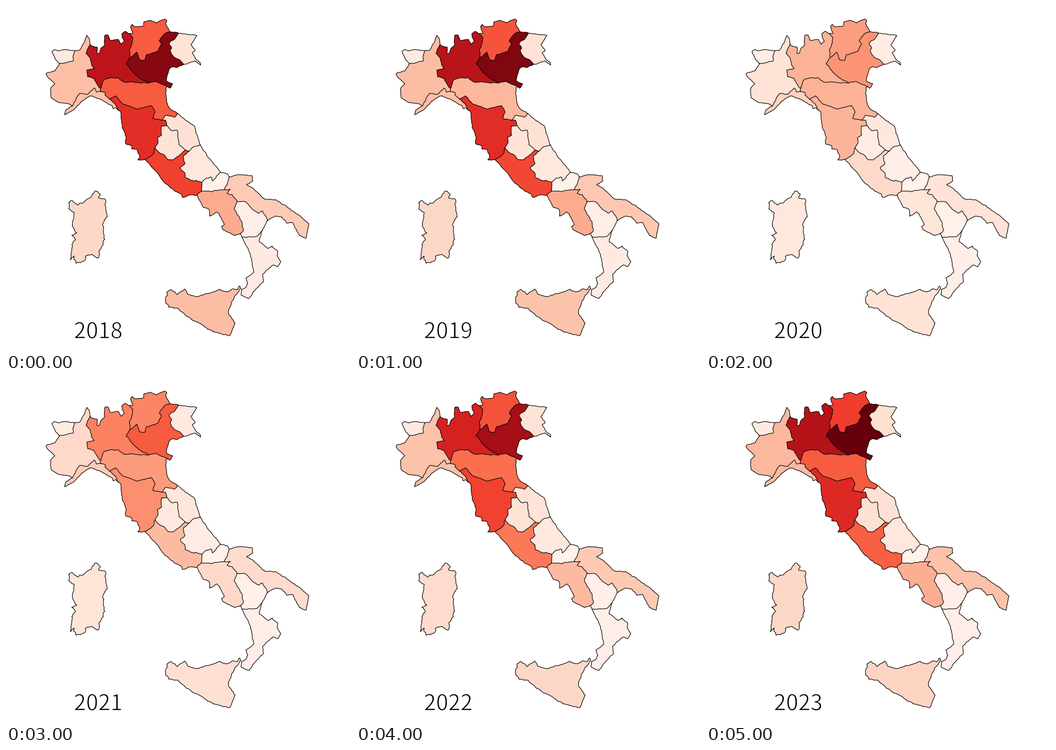
Write a matplotlib script that moves like this. It is 720x720 px and loops after 6000 ms.

```python
import numpy as np
import matplotlib.pyplot as plt
from matplotlib.animation import FuncAnimation
from matplotlib.patches import Polygon
from matplotlib.patheffects import Stroke

SIZE, DPI = 720, 72
YEARS = range(2018, 2024)
rng = np.random.default_rng(7)
reds = plt.get_cmap("Reds")

fig = plt.figure(figsize=(SIZE / DPI, SIZE / DPI), dpi=DPI, facecolor="white")
ax = fig.add_axes([0, 0, 1, 1])
ax.set_xlim(0, SIZE)
ax.set_ylim(SIZE, 0)
ax.axis("off")

borders = {}
regions = []


def border(name, *xy, rough=0.7):
    """Draw a wobbly hand-drawn line through a few key points."""
    pts = np.reshape(xy, (-1, 2)).astype(float)
    dist = np.r_[0, np.cumsum(np.hypot(*np.diff(pts, axis=0).T))]
    s = np.union1d(dist, np.arange(0, dist[-1], 3))
    path = np.column_stack([np.interp(s, dist, pts[:, k]) for k in (0, 1)])
    path[1:-1] += rng.normal(0, rough, path[1:-1].shape)
    path[1:-1] = (path[:-2] + 3 * path[1:-1] + path[2:]) / 5
    borders[name] = path
    ax.plot(*path.T, color="black", lw=1.25, zorder=2,
            solid_joinstyle="round", solid_capstyle="round")


def region(loop, before, dip, now, second=None):
    """Fill a chain of borders (a leading minus walks one backwards).

    The shade starts at `before`, drops to `dip` and climbs back to `now`.
    """
    parts = [borders[k.lstrip("-")][::-1 if k[0] == "-" else 1]
             for k in loop.split()]
    patch = ax.add_patch(Polygon(np.vstack(parts), lw=0, zorder=1))
    if second is None:
        second = before + 0.25 * (now - before)
    climb = [dip + t * (now - dip) for t in (0, 0.27, 0.8, 1)]
    regions.append((patch, [before, second, *climb]))


# North-west
border("aosta_n", 112, 121, 103, 111, 97, 95, 103, 91, 108, 94, 125, 91,
       144, 94)
border("aosta_s", 144, 94, 140, 106, 141, 115, 112, 121)
border("piem_w", 112, 121, 102, 136, 85, 141, 87, 149, 102, 163, 93, 173,
       95, 193, 110, 202, 127, 203, 139, 209)
border("piem_n", 144, 94, 155, 93, 163, 77, 169, 62, 174, 67, 176, 80)
border("piem_lomb", 176, 80, 167, 99, 177, 110, 179, 124, 185, 131, 169, 134,
       171, 148, 183, 151, 195, 171, 199, 171)
border("piem_emil", 199, 171, 198, 179)
border("piem_lig", 139, 209, 153, 183, 171, 185, 184, 172, 190, 180, 198, 179)
border("lig_coast", 139, 209, 124, 219, 123, 228, 142, 218, 157, 201, 177, 188,
       195, 194, 223, 210, 224, 216, 229, 213, 235, 218)
border("emil_lig", 198, 179, 207, 181, 208, 188, 217, 195)
border("lig_tosc", 217, 195, 229, 206, 235, 218)
border("lomb_n", 176, 80, 178, 83, 191, 87, 190, 99, 196, 98, 198, 90, 206, 82,
       206, 60, 214, 61, 218, 73, 235, 69, 240, 80, 248, 74, 242, 60,
       250, 53, 258, 58)

# North-east
border("lomb_tren", 258, 58, 266, 66, 262, 84, 258, 92, 260, 108)
border("tren_n", 258, 58, 266, 57, 260, 43, 264, 38, 271, 44, 288, 42, 289, 34,
       301, 30, 314, 35, 332, 27, 337, 30, 334, 37, 343, 54)
border("tren_ven", 260, 108, 274, 96, 279, 113, 290, 114, 294, 102, 317, 95,
       326, 80, 320, 73, 333, 56, 343, 54)
border("lomb_ven", 260, 108, 252, 121, 266, 140, 284, 154, 299, 161)
border("ven_n", 343, 54, 361, 57)
border("ven_friuli", 361, 57, 353, 70, 344, 73, 341, 80, 347, 87, 343, 94,
       352, 108, 362, 111, 372, 122)
border("friuli", 361, 57, 400, 62, 387, 80, 396, 93, 390, 98, 398, 112,
       407, 119, 407, 124, 396, 115, 372, 122)
border("ven_coast", 372, 122, 355, 129, 346, 127, 341, 133, 335, 157,
       349, 163, 343, 173, 338, 169)
border("ven_emil", 299, 161, 313, 158, 338, 169)
border("lomb_emil", 199, 171, 201, 160, 208, 152, 233, 150, 247, 159, 299, 161)
border("emil_coast", 338, 169, 334, 172, 337, 205, 343, 214, 359, 225)

# Centre
border("emil_mar", 326, 239, 334, 229, 354, 232, 359, 225)
border("emil_tosc", 217, 195, 230, 188, 243, 204, 275, 216, 305, 208,
       312, 221, 307, 235, 326, 239)
border("tosc_coast", 235, 218, 240, 222, 243, 252, 252, 275, 250, 288,
       264, 293, 264, 300, 274, 301, 280, 314, 276, 323, 291, 321)
border("tosc_mar", 326, 239, 334, 239, 337, 250)
border("tosc_umb", 337, 250, 325, 252, 326, 270, 317, 275, 318, 286, 312, 297)
border("tosc_laz", 312, 297, 309, 310, 291, 321)
border("umb_mar", 337, 250, 345, 261, 358, 260, 362, 290, 376, 302)
border("umb_laz", 312, 297, 323, 309, 331, 312, 338, 321, 350, 322, 376, 302)
border("laz_mar", 376, 302, 383, 304)
border("mar_coast", 359, 225, 366, 231, 396, 253, 397, 264, 407, 291)
border("mar_abr", 407, 291, 389, 296, 383, 304)
border("laz_abr", 383, 304, 371, 315, 375, 330, 366, 336, 365, 342, 374, 349,
       375, 359, 392, 367, 397, 364, 410, 369)
border("abr_coast", 407, 291, 411, 300, 449, 348)
border("abr_mol", 449, 348, 433, 366, 430, 358, 420, 360, 410, 369)
border("laz_mol", 410, 369, 409, 387)
border("laz_coast", 291, 321, 303, 335, 314, 346, 331, 369, 352, 387, 367, 393,
       369, 401, 382, 396, 400, 396)
border("laz_camp", 400, 396, 409, 387)

# South
border("mol_coast", 449, 348, 464, 352, 467, 358)
border("mol_pug", 467, 358, 463, 373, 457, 384)
border("mol_camp", 409, 387, 430, 388, 457, 384)
border("camp_pug", 457, 384, 470, 384, 463, 392, 473, 395, 484, 409)
border("camp_bas", 484, 409, 477, 424, 494, 452, 497, 471, 491, 476)
border("camp_coast", 400, 396, 412, 421, 425, 425, 426, 441, 440, 431, 447, 436,
       457, 458, 451, 462, 454, 468, 477, 480, 491, 476)
border("bas_pug", 484, 409, 502, 409, 517, 427, 528, 433, 537, 429, 547, 449)
border("bas_coast", 547, 449, 536, 470)
border("bas_w", 491, 476, 494, 484)
border("bas_cal", 494, 484, 526, 483, 536, 470)
border("pug_coast", 467, 358, 484, 353, 515, 355, 517, 366, 504, 374, 517, 382,
       541, 404, 564, 405, 613, 438, 634, 456, 628, 486, 614, 480, 600, 453,
       588, 455, 577, 441, 563, 440, 547, 449)
border("cal_coast", 536, 470, 530, 492, 548, 508, 556, 502, 569, 512, 567, 522,
       575, 536, 569, 545, 558, 542, 537, 561, 539, 576, 522, 593, 508, 612,
       492, 605, 493, 593, 502, 590, 506, 580, 502, 570, 518, 558, 512, 520,
       494, 484)

# Islands
border("sicily", 338, 598, 345, 594, 358, 603, 374, 592, 381, 603, 401, 608,
       448, 594, 462, 599, 475, 592, 484, 594, 488, 585, 491, 592, 473, 618,
       465, 643, 480, 663, 469, 691, 433, 681, 379, 650, 358, 633, 340, 630,
       333, 618, 338, 598, rough=1)
border("sardinia", 132, 411, 138, 406, 147, 416, 177, 402, 187, 388, 197, 394,
       196, 403, 208, 405, 211, 441, 203, 453, 205, 488, 192, 528, 181, 520,
       168, 521, 164, 533, 147, 538, 141, 523, 134, 533, 139, 500, 145, 489,
       138, 479, 147, 476, 139, 458, 144, 433, 132, 426, 132, 411, rough=1.4)

# Shades on the Reds scale: before, dip, now
region("aosta_n aosta_s", .07, .05, .07)
region("aosta_s piem_w piem_lig -piem_emil -piem_lomb -piem_n", .24, .11, .26)
region("piem_lomb lomb_emil -lomb_ven -lomb_tren -lomb_n", .80, .28, .82)
region("lomb_tren tren_ven -tren_n", .54, .34, .62)
region("lomb_ven ven_emil -ven_coast -ven_friuli -ven_n -tren_ven",
       .93, .37, 1)
region("ven_friuli -friuli", .11, .05, .13)
region("piem_lig emil_lig lig_tosc -lig_coast", .23, .17, .25)
region("lomb_emil ven_emil emil_coast -emil_mar -emil_tosc -emil_lig "
       "-piem_emil", .54, .28, .54, second=.265)
region("emil_tosc tosc_mar tosc_umb tosc_laz -tosc_coast -lig_tosc",
       .67, .27, .69)
region("tosc_umb umb_laz -umb_mar", .11, .05, .12)
region("emil_mar mar_coast mar_abr -laz_mar -umb_mar -tosc_mar",
       .12, .08, .12)
region("umb_laz laz_mar laz_abr laz_mol -laz_camp -laz_coast -tosc_laz",
       .61, .15, .53)
region("mar_abr laz_abr -abr_mol -abr_coast", .08, .04, .08)
region("abr_mol laz_mol mol_camp -mol_pug -mol_coast", .02, .02, .02)
region("laz_camp mol_camp camp_pug camp_bas -camp_coast", .30, .10, .29)
region("mol_pug camp_pug bas_pug -pug_coast", .20, .11, .23)
region("camp_bas bas_w bas_cal -bas_coast -bas_pug", .04, .03, .04)
region("bas_cal cal_coast", .07, .04, .04)
region("sicily", .245, .11, .17)
region("sardinia", .155, .075, .16)

# A thin white outline slims the digits to a light weight
label = ax.text(142, 695.5, "", family="Noto Sans CJK JP", size=46,
                color="black", va="baseline",
                path_effects=[Stroke(linewidth=1.2, foreground="white")])


def update(i):
    for patch, shades in regions:
        patch.set_facecolor(reds(float(shades[i])))
    label.set_text(str(YEARS[i]))
    return [patch for patch, _ in regions] + [label]


anim = FuncAnimation(fig, update, frames=len(YEARS), interval=1000,
                     repeat=True, repeat_delay=0)
plt.show()
```
